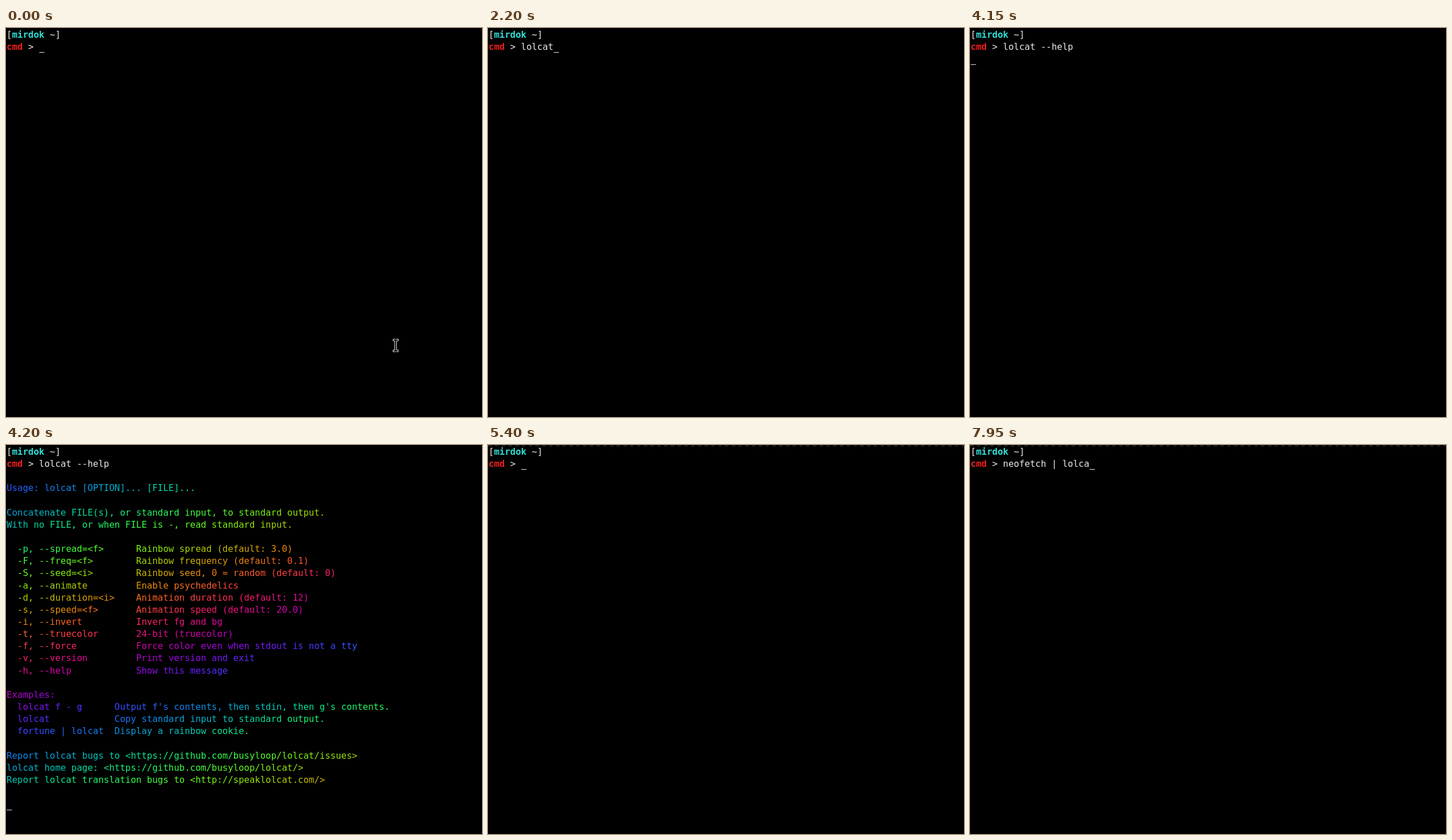
Recreate the animation shown at these times as an HTML page. Size 827x677 px, loop 8000 ms.

```html
<!DOCTYPE html>
<html lang="en">
<head>
<meta charset="utf-8">
<title>Terminal</title>
<style>
  :root { --cw: 9.39px; --lh: 21.17px; }
  html, body { margin: 0; width: 100%; height: 100%; overflow: hidden; background: #000; }
  #term {
    position: absolute; left: 1px; top: 1.8px;
    font: 15.6px/var(--lh) "DejaVu Sans Mono", monospace;
    color: #e9e9e9;
  }
  .row { height: var(--lh); white-space: nowrap; }
  .row span { display: inline-block; width: var(--cw); height: var(--lh); white-space: pre; vertical-align: top; }
  .user { color: #30e0d8; font-weight: bold; }
  .cmd { color: #f01c1c; font-weight: bold; }
  #caret { position: absolute; left: 0; top: 0; width: 9px; height: 1.6px; background: #eee; }
  #dashes {
    position: absolute; left: 0; top: 1px; width: 100%; height: 1px;
    background: repeating-linear-gradient(90deg, #404040 0 6.5px, transparent 6.5px 11.75px);
  }
  #mouse { position: absolute; left: 671px; top: 540px; }
</style>
</head>
<body>
<div id="dashes"></div>
<div id="term"><div id="caret"></div></div>
<svg id="mouse" width="13" height="25" viewBox="0 0 13 25">
  <path d="M1.5 1.5H5L6 2.5 7 1.5H10.5V4.5H7.5V20.5H10.5V23.5H7L6 22.5 5 23.5H1.5V20.5H4.5V4.5H1.5Z" stroke="#e8e8e8" fill="#000"/>
</svg>
<script>
const LOOP = 8000, CELL = 9.39, LINE = 21.17;
const PROMPT_COLS = 6;

const help = `
Usage: lolcat [OPTION]... [FILE]...

Concatenate FILE(s), or standard input, to standard output.
With no FILE, or when FILE is -, read standard input.

  -p, --spread=<f>      Rainbow spread (default: 3.0)
  -F, --freq=<f>        Rainbow frequency (default: 0.1)
  -S, --seed=<i>        Rainbow seed, 0 = random (default: 0)
  -a, --animate         Enable psychedelics
  -d, --duration=<i>    Animation duration (default: 12)
  -s, --speed=<f>       Animation speed (default: 20.0)
  -i, --invert          Invert fg and bg
  -t, --truecolor       24-bit (truecolor)
  -f, --force           Force color even when stdout is not a tty
  -v, --version         Print version and exit
  -h, --help            Show this message

Examples:
  lolcat f - g      Output f's contents, then stdin, then g's contents.
  lolcat            Copy standard input to standard output.
  fortune | lolcat  Display a rainbow cookie.

Report lolcat bugs to <https://github.com/busyloop/lolcat/issues>
lolcat home page: <https://github.com/busyloop/lolcat/>
Report lolcat translation bugs to <http://speaklolcat.com/>
`.split("\n");

// [time, characters typed]
const first = [[1550, 1], [1650, 2], [1750, 3], [1850, 4], [2000, 5], [2200, 6], [2350, 7],
  [3250, 8], [3400, 9], [3600, 10], [3700, 11], [3800, 12], [3950, 13]];
const second = [[5800, 2], [5950, 3], [6050, 4], [6400, 8], [6450, 9], [7050, 10], [7250, 11],
  [7450, 12], [7600, 13], [7750, 14], [7850, 15], [7950, 16]];
const ENTER = 4150, OUTPUT = 4200, DONE = 4250, CLEAR = 5400;

const $ = id => document.getElementById(id);
const term = $("term"), caret = $("caret"), mouse = $("mouse"), dashes = $("dashes");

function addDiv(parent, cls = "") {
  const div = document.createElement("div");
  div.className = cls;
  parent.append(div);
  return div;
}

function put(row, text, style = () => ({})) {
  [...text].forEach((ch, col) => {
    const cell = document.createElement("span");
    cell.textContent = ch;
    const { color, cls } = style(col);
    if (color) cell.style.color = color;
    if (cls) cell.className = cls;
    row.append(cell);
  });
}

function addPrompt(parent) {
  put(addDiv(parent, "row"), "[mirdok ~]", c => ({ cls: c > 0 && c < 7 ? "user" : "" }));
  const row = addDiv(parent, "row");
  put(row, "cmd > ", c => ({ cls: c < 3 ? "cmd" : "" }));
  return row;
}

function rainbow(line, col) {
  const angle = 3.55 + 0.3 * (line + col / 8);
  const [r, g, b] = [0, 2, 4].map(k => Math.round(Math.sin(angle + k * Math.PI / 3) * 127 + 128));
  return `rgb(${r},${g},${b})`;
}

const input = addPrompt(term);
const output = addDiv(term);
help.forEach((text, line) => put(addDiv(output, "row"), text, col => ({ color: rainbow(line, col) })));
const nextPrompt = addDiv(term);
addPrompt(nextPrompt);

const show = (el, on) => { el.style.visibility = on ? "visible" : "hidden"; };
const typedAt = (keys, t) => keys.reduce((n, [at, count]) => t >= at ? count : n, 0);

let shown = "";
function setInput(text) {
  if (text === shown) return;
  shown = text;
  while (input.children.length > PROMPT_COLS) input.lastChild.remove();
  put(input, text);
}

function caretPlace(t, typed) {
  if (t < ENTER || t >= CLEAR) return [PROMPT_COLS + typed, 1];
  if (t < OUTPUT) return [0, 2];
  return t < DONE ? [0, 2 + help.length] : [PROMPT_COLS, 3 + help.length];
}

function render(t) {
  const cleared = t >= CLEAR;
  const typed = typedAt(cleared ? second : first, t);
  setInput((cleared ? "neofetch | lolcat" : "lolcat --help").slice(0, typed));
  show(output, t >= OUTPUT && !cleared);
  show(nextPrompt, t >= DONE && !cleared);
  show(dashes, cleared);

  const [col, row] = caretPlace(t, typed);
  caret.style.transform = `translate(${col * CELL + 0.4}px, ${row * LINE + 18.8}px)`;

  show(mouse, t < 350);
  mouse.style.transform = t < 250 ? "none" : "translate(4px, 74px)";
}

function frame() {
  render(performance.now() % LOOP);
  requestAnimationFrame(frame);
}
frame();
</script>
</body>
</html>
```
